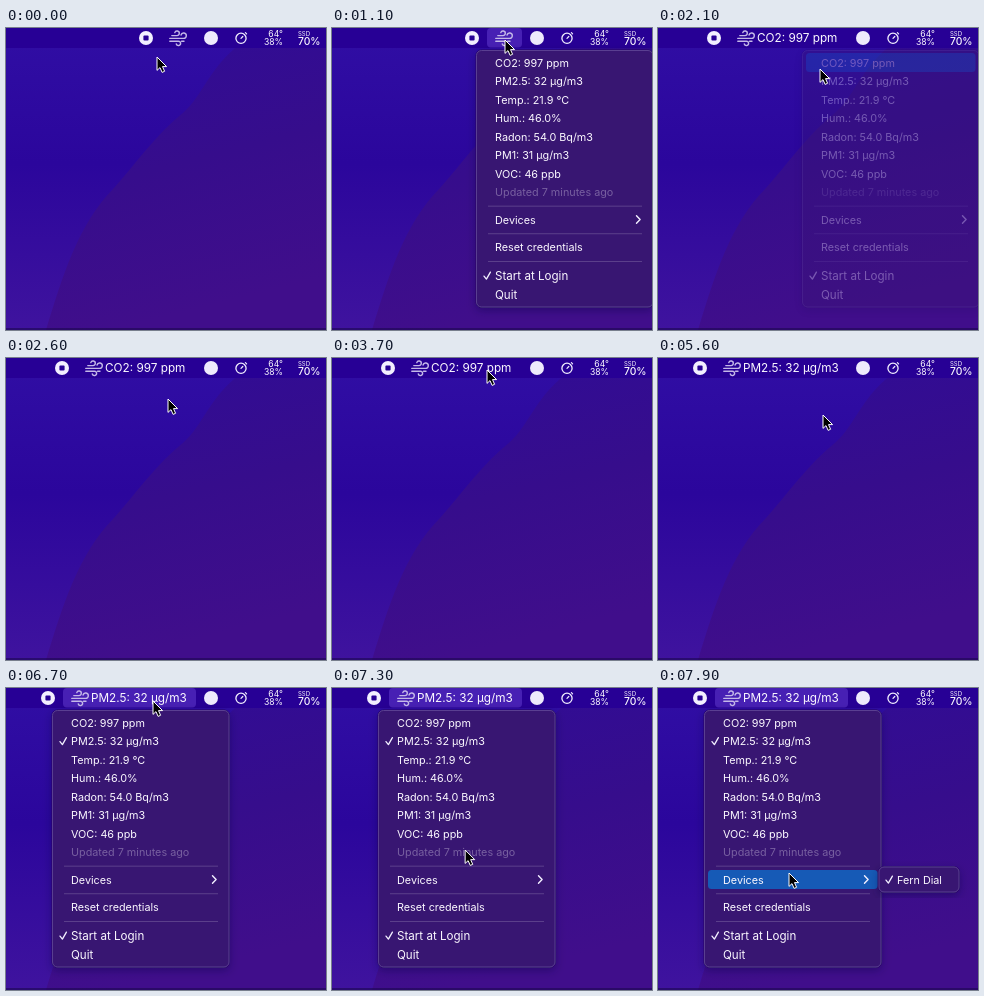
Animation, 320 px wide and 302 px high, one loop 8 s. Source, as an HTML page:

```html
<!DOCTYPE html>
<html lang="en">
<head>
<meta charset="utf-8">
<title>Air quality menu</title>
<style>
html, body { margin: 0; width: 100%; height: 100%; overflow: hidden; background: #2c0a9c; }
svg { display: block; width: 320px; height: 302px; }
text { font: 11px Inter, Roboto, sans-serif; fill: #fbf8ff; white-space: pre; }
.title { font-size: 11.75px; }
.line { fill: none; stroke: #f2efff; stroke-linecap: round; stroke-linejoin: round; }
</style>
</head>
<body>
<svg viewBox="0 0 320 302">
  <defs>
    <linearGradient id="sky" x1="0" y1="0" x2="0" y2="1">
      <stop offset="0" stop-color="#300ea4"/>
      <stop offset=".45" stop-color="#2b069c"/>
      <stop offset="1" stop-color="#3f139e"/>
    </linearGradient>
    <linearGradient id="hill" x1="0" y1="0" x2=".25" y2="1">
      <stop offset="0" stop-color="#300c96"/>
      <stop offset=".5" stop-color="#360d8c"/>
      <stop offset="1" stop-color="#400e8b"/>
    </linearGradient>
    <filter id="shadow" x="-20%" y="-20%" width="140%" height="140%">
      <feDropShadow dx="0" dy="3" stdDeviation="4" flood-color="#10003a" flood-opacity=".35"/>
    </filter>
  </defs>
  <rect width="320" height="302" fill="url(#sky)"/>
  <path d="M232 18C205 38 196 68 178 84C150 106 128 138 108 160C72 196 56 250 40 302H320V18Z" fill="url(#hill)"/>
  <rect y="300" width="320" height="2" fill="#1c0850" opacity=".6"/>
  <rect width="320" height="20" fill="#270095"/>
  <g id="status">
    <circle cx="205" cy="10" r="7" fill="#eeeafc"/>
    <circle class="line" cx="235" cy="10.3" r="5.1" stroke-width="1.3"/>
    <path class="line" stroke-width="1.2" d="M235 10.3L236.8 8.5M239.4 4.6L240.6 5.8"/>
    <g text-anchor="end">
      <text x="277" y="9" style="font-size:8.6px">64°</text>
      <text x="277" y="17.4" style="font-size:8.6px">38%</text>
    </g>
    <text x="292" y="7.6" style="font-size:6px">SSD</text>
    <text x="292" y="17.2" style="font-size:10.3px;font-weight:500">70%</text>
  </g>
  <g id="live"></g>
</svg>
<script>
const LOOP = 8000;
const live = document.getElementById('live');

// Menu rows: label, centre y, font size
const ROWS = [
  ['CO2: 997 ppm', 34.5], ['PM2.5: 32 µg/m3', 53], ['Temp.: 21.9 °C', 71.5],
  ['Hum.: 46.0%', 90], ['Radon: 54.0 Bq/m3', 108.5], ['PM1: 31 µg/m3', 127],
  ['VOC: 46 ppb', 145.5], ['Updated 7 minutes ago', 164], ['Devices', 191.5],
  ['Reset credentials', 219], ['Start at Login', 247.5, 11.6], ['Quit', 267, 11.6]
];
const UPDATED = 7, DEVICES = 8, LOGIN = 10;

// Left edge of the menu bar item for each chosen reading
const STATES = [
  { from: 0, left: 155, chosen: -1 },
  { from: 2000, left: 71, chosen: 0 },
  { from: 5000, left: 57, chosen: 1 }
];
const OPEN = [[1020, 2000], [3800, 5000], [6500, LOOP + 1000]];
const FADE = 150;

// Pointer keys: time, x, y
const PATH = [
  [0, 151, 29], [250, 153, 34], [900, 173, 12], [1150, 173, 12], [1650, 162, 41],
  [2900, 162, 41], [3600, 155, 12], [3900, 155, 12], [4450, 162, 61], [4800, 162, 61],
  [5150, 165, 57], [5750, 165, 57], [6350, 147, 13], [6800, 147, 13], [7450, 131, 185],
  [LOOP, 131, 185]
];

function pointer(t) {
  const i = PATH.findIndex(p => p[0] > t);
  const [t0, x0, y0] = PATH[i - 1], [t1, x1, y1] = PATH[i];
  const u = (t - t0) / (t1 - t0), e = u * u * (3 - 2 * u);
  return [x0 + (x1 - x0) * e, y0 + (y1 - y0) * e];
}

const rect = (x, y, w, h, r, fill, extra = '') =>
  `<rect x="${x}" y="${y}" width="${w}" height="${h}" rx="${r}" fill="${fill}" ${extra}/>`;
const line = (d, width, extra = '') => `<path class="line" d="${d}" stroke-width="${width}" ${extra}/>`;
const label = (x, y, s, size = 10.8, extra = '') =>
  `<text x="${x}" y="${y + 4}" style="font-size:${size}px" ${extra}>${s}</text>`;
const check = (x, y) => line(`M${x} ${y + .6}l2.4 3l4-7`, 1.3);
const panel = (x, y, w, h) =>
  rect(x, y, w, h, 5.5, '#381572', 'stroke="#220a5c" stroke-width=".8" filter="url(#shadow)"') +
  rect(x + .5, y + .5, w - 1, h - 1, 5, 'none', 'stroke="#5f4696" stroke-width=".9"');
const highlight = (x, y, w) => rect(x, y - 9.4, w, 18.8, 3.5, '#165ab6');

function barItem({ left, chosen }, active) {
  const stop = left - 15, x = left + 8;
  return (active ? rect(left, 0, 190 - left, 19.5, 4, '#4720b4') : '') +
    `<circle cx="${stop}" cy="10" r="7" fill="#f2efff"/>` +
    rect(stop - 2.6, 7.4, 5.2, 5.2, 1, '#270095') +
    `<g transform="translate(${x} 0)">` +
    line('M2.8 7.6H8A2.3 2.3 0 1 0 5.8 4.6M.8 10.4H14.6A2.7 2.7 0 1 0 12 7' +
         'M.8 13.2H9.4A2.2 2.2 0 1 1 7.3 16M12.6 13.2H15', 1.4, 'style="stroke:#c4b8e8"') +
    '</g>' +
    (chosen < 0 ? '' : `<text class="title" x="${x + 20}" y="14">${ROWS[chosen][0]}</text>`);
}

function menu({ left, chosen }, hover) {
  const x = left - 11, textX = x + 19;
  let s = panel(x, 22, 177.5, 257.5);
  if (hover >= 0) s += highlight(x + 4, ROWS[hover][1], 169.5);
  for (const y of [177.7, 205.3, 233])
    s += rect(x + 12, y, 154, .9, 0, '#fff', 'opacity=".2"');
  ROWS.forEach(([name, y, size], i) => {
    s += label(textX, y, name, size, i === UPDATED ? 'opacity=".32"' : '');
    if (i === chosen || i === LOGIN) s += check(x + 8, y);
  });
  s += line(`M${x + 160.5} 187.7l3.6 3.8l-3.6 3.8`, 1.4);
  if (hover === DEVICES)
    s += panel(x + 174.5, 178.5, 81, 26) + check(x + 182, 191.5) + label(x + 193, 191.5, 'Fern Dial');
  return s;
}

const cursor = (x, y) =>
  `<path transform="translate(${x} ${y})" d="M0 0V13.4L3 10.6L5.1 15.4L7.6 14.3L5.5 9.6H9.6Z"
    fill="#000" stroke="#fff" stroke-width="1" stroke-linejoin="round"/>`;

function draw(t) {
  const [x, y] = pointer(t);
  const state = STATES.findLast(s => t >= s.from);
  const shown = OPEN.find(([a, b]) => t >= a && t < b + FADE);
  let s = barItem(state, shown && t < shown[1]);
  if (shown) {
    const owner = STATES.findLast(o => shown[0] >= o.from);
    const hover = ROWS.findIndex((r, i) => i !== UPDATED && Math.abs(r[1] - y) < 9.25);
    const alpha = Math.min(1, 1 - (t - shown[1]) / FADE);
    s += `<g opacity="${alpha}">${menu(owner, hover)}</g>`;
  }
  live.innerHTML = s + cursor(x, y);
}

const start = performance.now();
function tick() {
  draw((performance.now() - start) % LOOP);
  requestAnimationFrame(tick);
}
tick();
</script>
</body>
</html>
```
